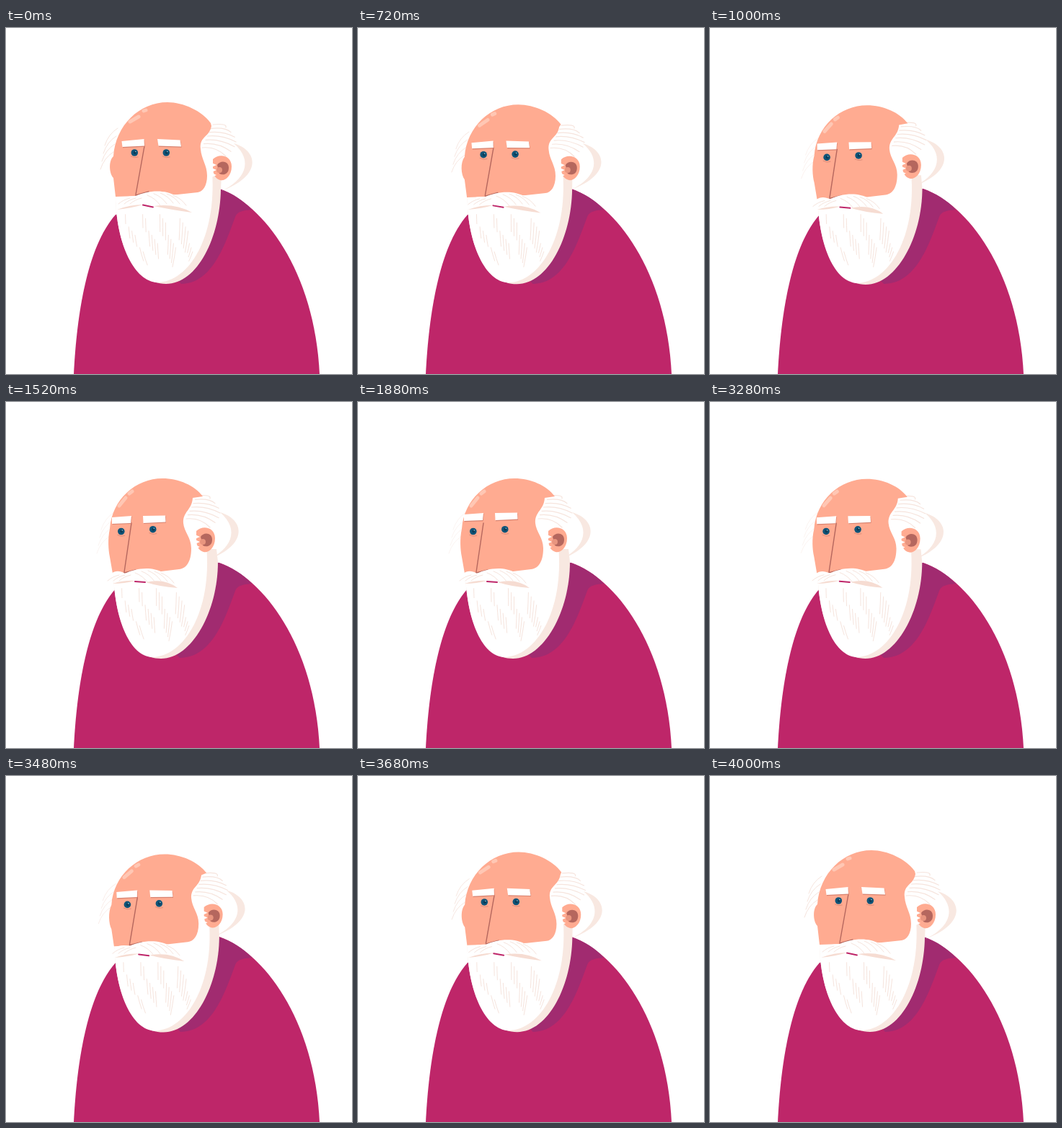
An HTML page for the animation above (4.04 s loop, 480 px wide and 480 px high).

```html
<!DOCTYPE html>
<html lang="en">
<head>
<meta charset="utf-8">
<title>Old man turning his head</title>
<style>
html, body { margin: 0; width: 100%; height: 100%; overflow: hidden; background: #fff; }
svg { display: block; width: 100vw; height: 100vh; }
</style>
</head>
<body>
<svg id="stage" viewBox="0 0 480 480" fill="none" stroke-linecap="round"></svg>
<script>
const LOOP = 4040;
const SKIN = '#ffab91', ROBE = '#be2669', SHADE = '#a12b70', CREAM = '#f8e8e1', STRAND = '#f6e4dd';
const FOLD = '#f6dcd2', BROWN = '#b5675e', BLUE = '#0f5478', SHINE = '#ffc7b4', WHITE = '#fff';
const stage = document.getElementById('stage');
const parts = [];

const mix = (a, b, t) => a + (b - a) * t;
const clamp = x => Math.min(1, Math.max(0, x));
const NUMBER = /-?\d+(\.\d+)?/g;
const mapNumbers = (path, fn) => {
  let i = 0;
  return path.replace(NUMBER, n => fn(+n, i++));
};

function add(attrs) {
  const el = document.createElementNS('http://www.w3.org/2000/svg', 'path');
  for (const key in attrs) el.setAttribute(key, attrs[key]);
  return stage.appendChild(el);
}

// A part goes from its front path to a turned path, or to a shifted copy [dx, dy].
function part(attrs, front, turned, extra) {
  const target = Array.isArray(turned) ? mapNumbers(front, (n, i) => n + turned[i % 2]) : turned;
  parts.push({ el: add(attrs), front, turned: target.match(NUMBER).map(Number), ...extra });
}
const fill = (color, front, turned, extra) => part({ fill: color }, front, turned, extra);
const line = (color, width, front, turned, extra) =>
  part({ stroke: color, 'stroke-width': width }, front, turned, extra);
const dot = (color, radius, x, y, turned) => line(color, radius * 2, `M${x} ${y}L${x} ${y}`, turned);

// Robe
add({ fill: ROBE, d: 'M94 480C98 400 112 304 152 259L296 223C356 244 428 336 435 480Z' });
fill(SHADE,
  'M296 223C316 230 330 240 341 252C330 253 321 254 318 262C304 300 286 355 243 355L220 330Z',
  'M292 222C314 229 330 240 341 252C330 253 321 254 318 262C304 300 286 355 241 355L215 330Z');

// Back of the hair and its strands
fill(CREAM, 'M316 160C350 170 356 205 299 226C330 212 345 185 316 160Z', [-19, -7]);
for (let i = 0; i < 7; i++) {
  const k = i / 6, bulge = 14 * Math.sin(Math.PI * k);
  const x = mix(287, 272, k), y = mix(134, 166, k);
  const endX = 305 + bulge, endY = mix(138, 178, k);
  line(STRAND, 1.2, `M${x} ${y}Q${x + 20} ${y - 2} ${endX} ${endY}`, [-22, -4]);
}
for (let i = 0; i < 4; i++) {
  const x = 155 - i * 2, y = 139 + i * 11;
  line(STRAND, 1, `M${x} ${y}Q${x - 13} ${y + 8} ${x - 18} ${y + 24}`, [-5, 14], { fade: .6 });
}

// Beard
fill(CREAM,
  'M152 234C153 300 178 355 222 355C266 355 297 290 298 224L299 204L280 204Z',
  'M149 238C151 305 173 356 215 356C258 356 294 290 294 222L292 204L270 204Z');
fill(WHITE,
  'M152 234C153 300 178 352 210 353C254 352 292 290 286 200L260 200Z',
  'M149 238C151 305 173 353 203 354C247 353 286 290 278 200L250 200Z');

// Beard strands follow its taper.
function strand(u, from, to, centerX) {
  const at = v => {
    const half = 58 * Math.sqrt(1 - .92 * v ** 2.5);
    return `${(centerX + u * half).toFixed(1)} ${(255 + 92 * v).toFixed(1)}`;
  };
  return `M${at(from)}Q${at((from + to) / 2)} ${at(to)}`;
}
for (let i = 0; i < 26; i++) {
  const u = -.92 + (i * 11 % 26) / 25 * 1.72;
  const from = .04 + (i * 7 % 10) / 16;
  const to = Math.min(.95, from + .14 + (i * 3 % 7) * .03);
  line(STRAND, 1, strand(u, from, to, 219), strand(u, from, to, 214));
}

// Head
fill(SKIN,
  'M152 234L149 208C143 202 142 184 149 178C152 135 185 103 224 103C246 103 272 115 284 132' +
  'L285 136C282 152 268 150 270 168C271 182 279 190 279 205C279 219 273 227 266 228L238 231Z',
  'M148 238L144 215C142 205 141 190 144 176C147 135 180 106 217 106C240 106 262 116 273 131' +
  'L259 133C258 150 245 152 246 168C247 180 257 188 257 203C257 222 250 231 240 232L215 235Z');
line(SHINE, 5, 'M172 130L184 123', 'M157 144L166 133');
line(SHINE, 5, 'M191 115L194 114', 'M171 127L175 124');

// Ear
const EAR = [-23, -3];
fill(SKIN, 'M287 182C296 173 313 177 313 192C313 206 303 213 297 211C290 209 288 203 287 196Z', EAR);
fill(BROWN, 'M293 190C297 183 309 184 309 194C309 203 301 205 296 202Z', EAR);
dot('#e9957f', 4, 296, 197, EAR);
for (let y = 186; y < 206; y += 7) fill(WHITE, `M283 ${y}L292 ${y + 4}L283 ${y + 8}Z`, EAR);

// Nose
line(BROWN, 1.4, 'M192 164L180 231', 'M174 168L164 236');
line(BROWN, 1.4, 'M180 232L198 227', 'M164 237L180 233');

// Eyes
for (const x of [178.3, 222.3]) {
  const y = 173, shift = [-18.5, x < 200 ? 6.5 : 3.7];
  line('#dd8b77', 1, `M${x - 5} ${y + 5}Q${x} ${y + 8} ${x + 5} ${y + 6}`, shift);
  dot(BLUE, 4.8, x, y, shift);
  dot('#0b3a55', 2, x + .5, y, shift);
  dot('#9fc6d4', .8, x + 1.5, y - 1.5, shift);
}

// Eyebrows with a thin shadow below
for (const [front, turned] of [
  ['M160.5 157L191.5 154L192 163.5L161.5 165Z', 'M147 160L174 158L173 168L147 169Z'],
  ['M210 154L241.5 155.5L243 164.5L211.5 163.5Z', 'M190 158L221 157.5L221.5 166.5L190.5 168Z']
]) {
  const lower = path => mapNumbers(path, (n, i) => n + (i % 2 ? 1.2 : .6));
  fill('#d88370', lower(front), lower(turned), { brow: true });
  fill(WHITE, front, turned, { brow: true });
}

// Moustache and mouth
fill(WHITE,
  'M153 252C152 240 158 234 180 233C205 222 240 222 258 256C235 250 222 246 205 246L189 244C175 245 165 248 153 252Z',
  'M140 248C145 234 155 232 165 238C187 227 222 226 238 257C218 254 208 250 194 250L178 249C165 249 155 252 140 248Z');
fill(FOLD,
  'M205 247Q235 243 258 256Q228 252 205 247Z',
  'M194 250Q220 244 238 258Q212 256 194 250Z');
fill(FOLD,
  'M154 252Q172 245 190 245Q174 250 154 252Z',
  'M148 252Q164 247 179 248Q165 252 148 252Z');
for (let i = 0; i < 5; i++) {
  const x = 196 + i * 9, y = 232 - 3 * Math.sin(i * .8);
  line(STRAND, 1, `M${x} ${y}Q${x + 11} ${y + 4} ${x + 18} ${y + 14}`, [-17, 5]);
}
for (let i = 0; i < 3; i++) {
  const x = 188 - i * 8;
  line(STRAND, 1, `M${x} 236Q${x - 9} 238 ${x - 16} 244`, [-15, 4]);
}
line(ROBE, 2, 'M190 245.6L204 248.4', 'M179 249L193 250');

// Eased step with control points (.4, 0) and (.37, 1).
function ease(time, start, duration) {
  const x = clamp((time - start) / duration);
  let low = 0, high = 1;
  for (let i = 0; i < 20; i++) {
    const s = (low + high) / 2, r = 1 - s;
    if (3 * r * r * s * .4 + 3 * r * s * s * .37 + s * s * s < x) low = s;
    else high = s;
  }
  return low * low * (3 - 2 * low);
}

function render(time) {
  const turn = ease(time, 520, 720) - ease(time, 3140, 860);
  const raise = 4 * (ease(time, 1480, 400) - ease(time, 2040, 480));
  // The crown dips halfway through the turn; the chin stays level.
  const dip = 4 * Math.sin(Math.PI * turn);
  for (const { el, front, turned, brow, fade } of parts) {
    el.setAttribute('d', mapNumbers(front, (n, i) => {
      let value = mix(n, turned[i], turn);
      if (i % 2) value += dip * clamp((235 - n) / 130) - (brow ? raise : 0);
      return value.toFixed(2);
    }));
    if (fade) el.setAttribute('opacity', 1 - fade * turn);
  }
}

const begin = performance.now();
function tick() {
  render((performance.now() - begin) % LOOP);
  requestAnimationFrame(tick);
}
tick();
</script>
</body>
</html>
```
